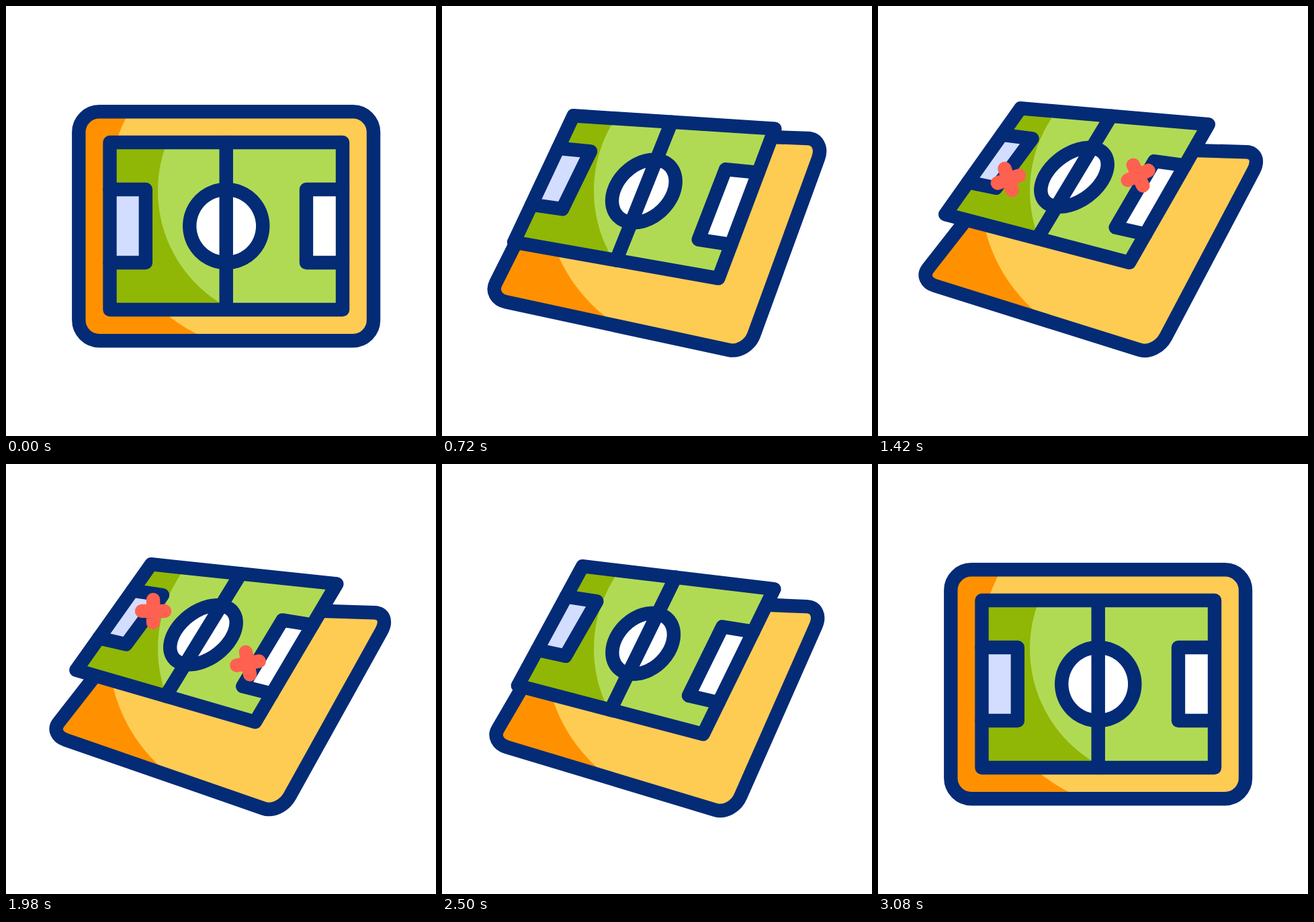
Recreate the animation shown at these times as an HTML page. Size 640 px wide and 640 px high, loop 3.2 s.

```html
<!DOCTYPE html>
<html lang="en">
<head>
<meta charset="utf-8">
<title>Football pitch</title>
<style>
  html, body { margin: 0; width: 100%; height: 100%; overflow: hidden; background: #fff; }
  svg { display: block; width: 100%; height: 100%; }
  .line { fill: none; stroke: #042b76; stroke-width: 20.4; stroke-linecap: round; stroke-linejoin: round; }
  .mark { fill: none; stroke: #ff6150; stroke-width: 20.4; stroke-linecap: round; }
</style>
</head>
<body>
<svg viewBox="0 0 640 640">
  <defs>
    <clipPath id="boardClip"><path class="board"/></clipPath>
    <clipPath id="fieldClip"><path class="field"/></clipPath>
  </defs>
  <g clip-path="url(#boardClip)">
    <rect width="640" height="640" fill="#ff9100"/>
    <circle cx="391" cy="275" r="238.5" fill="#ffcc53"/>
    <rect x="391" width="249" height="640" fill="#ffcc53"/>
  </g>
  <path class="board line"/>
  <g clip-path="url(#fieldClip)">
    <rect width="640" height="640" fill="#90b706"/>
    <circle cx="423" cy="275" r="197" fill="#b1da54"/>
    <rect x="423" width="217" height="640" fill="#b1da54"/>
  </g>
  <path class="ring" fill="#fff"/>
  <path class="goalL" fill="#d3ddff"/>
  <path class="goalR" fill="#fff"/>
  <path class="ring line"/>
  <path class="goalL line"/>
  <path class="goalR line"/>
  <path class="middle line"/>
  <path class="field line"/>
  <path class="mark" id="markL" d="M-17 0H17M0-17V17"/>
  <path class="mark" id="markR" d="M-17 0H17M0-17V17"/>
</svg>
<script>
const LOOP = 3200;
const RISE = [110, 1040], FALL = [2300, 3070];

// Poses: flat, rising, raised, end of drift, falling. Corners run clockwise from top left.
const BOARD = [
  [108.3, 157.2, 547, 157.2, 547, 498.2, 108.3, 498.2],
  [195, 183, 570.5, 198, 454, 517.8, 68.8, 434.9],
  [220.7, 205, 573, 215.3, 418.4, 518.5, 57.2, 413],
  [211.7, 213, 573.9, 224.3, 403.8, 521.9, 67.4, 398.6],
  [198, 198, 568.7, 213.3, 431.8, 522.5, 71.7, 413.8]
];
const FIELD = [
  [154.5, 203, 501, 203, 501, 452, 154.5, 452],
  [195.5, 163.3, 495.4, 182.7, 411.6, 405.5, 107.1, 351.7],
  [209.4, 154.4, 491.5, 174.6, 376.2, 380.3, 97.3, 312.3],
  [218.4, 147.4, 492.6, 179.8, 369, 385.3, 106.8, 304.9],
  [209.3, 152.1, 494.4, 186, 388.5, 402, 112.8, 329.6]
];
// Half width, half height, slant
const RING = [
  [54.5, 54.5, 0],
  [47.3, 46.8, -.31],
  [50, 43.8, -.45],
  [49, 44.2, -.41],
  [45.8, 45.3, -.3]
];

const clamp = x => Math.min(1, Math.max(0, x));
const span = (t, [a, b]) => clamp((t - a) / (b - a));
const smooth = x => x * x * (3 - 2 * x);
const lerp = (a, b, k) => a + (b - a) * k;
const mix = (p, q, k) => [lerp(p[0], q[0], k), lerp(p[1], q[1], k)];
const rise = t => smooth(span(t, RISE));
const fall = t => smooth(span(t, FALL));
const drift = t => span(t, [RISE[1], FALL[0]]);
const RISE_VIA = rise(720), FALL_VIA = fall(2500);

// Curved path from a to b that passes through via at progress k
function bend(a, via, b, k, p) {
  const bulge = (via - lerp(a, b, k)) / (k * (1 - k));
  return lerp(a, b, p) + bulge * p * (1 - p);
}

function pose(poses, t) {
  const [flat, up, high, late, down] = poses;
  return flat.map((v, i) => {
    if (t < RISE[1]) return bend(v, up[i], high[i], RISE_VIA, rise(t));
    if (t < FALL[0]) return lerp(high[i], late[i], drift(t));
    return bend(late[i], down[i], v, FALL_VIA, fall(t));
  });
}

const corners = v => [0, 2, 4, 6].map(i => [v[i], v[i + 1]]);
const xy = p => p[0].toFixed(2) + ' ' + p[1].toFixed(2);
const poly = pts => 'M' + pts.map(xy).join('L');

function draw(name, d) {
  document.querySelectorAll('.' + name).forEach(el => el.setAttribute('d', d));
}

function roundedQuad(pts) {
  const d = pts.map((p, i) => {
    const prev = pts[(i + 3) % 4], next = pts[(i + 1) % 4];
    const [cutIn, cutOut] = i % 2 ? [.0698, .0897] : [.0897, .0698];
    const a = mix(p, prev, cutIn), b = mix(p, next, cutOut);
    return xy(a) + 'C' + [mix(a, p, .552), mix(b, p, .552), b].map(xy).join(' ');
  });
  return 'M' + d.join('L') + 'Z';
}

function ringPath([cx, cy], [w, h, slant]) {
  const pts = [], rest = Math.sqrt(1 - slant * slant);
  for (let i = 0; i < 90; i++) {
    const a = i * Math.PI / 45;
    pts.push([cx + w * Math.cos(a), cy + h * (slant * Math.cos(a) + rest * Math.sin(a))]);
  }
  return poly(pts) + 'Z';
}

function placeMark(id, from, to, turnFrom, turnTo, t) {
  const k = drift(t), el = document.getElementById(id);
  const size = smooth(span(t, [1000, 1200])) * (1 - smooth(span(t, [2140, 2340])));
  el.style.display = size > 0 ? '' : 'none';
  el.setAttribute('transform',
    `translate(${xy(mix(from, to, k))}) rotate(${lerp(turnFrom, turnTo, k)}) scale(${size})`);
}

function render(t) {
  const [tl, tr, br, bl] = corners(pose(FIELD, t));
  const lift = rise(t) * (1 - fall(t));
  const at = (u, v) => mix(mix(tl, bl, v), mix(tr, br, v), u);

  draw('board', roundedQuad(corners(pose(BOARD, t))));
  draw('field', poly([tl, tr, br, bl]) + 'Z');

  const top = at(.5 - .018 * lift, 0), bottom = at(.5, 1);
  draw('middle', poly([top, bottom]));
  draw('ring', ringPath(mix(top, bottom, .5), pose(RING, t)));

  const goal = (edge, uTop, uBottom, vTop, vBottom) =>
    poly([at(edge, vTop), at(uTop, vTop), at(uBottom, vBottom), at(edge, vBottom)]);
  draw('goalL', goal(0, .154 + .009 * lift, .154 - .004 * lift, .281 - .032 * lift, .719 - .022 * lift));
  draw('goalR', goal(1, .844 - .008 * lift, .844 - .006 * lift, .281 + .016 * lift, .719 + .076 * lift));

  placeMark('markL', [177, 284.5], [233.3, 196.7], 58, 101, t);
  placeMark('markR', [405.4, 221.7], [344.6, 322], 55, 88, t);
}

function frame() {
  render(performance.now() % LOOP);
  requestAnimationFrame(frame);
}
frame();
</script>
</body>
</html>
```
